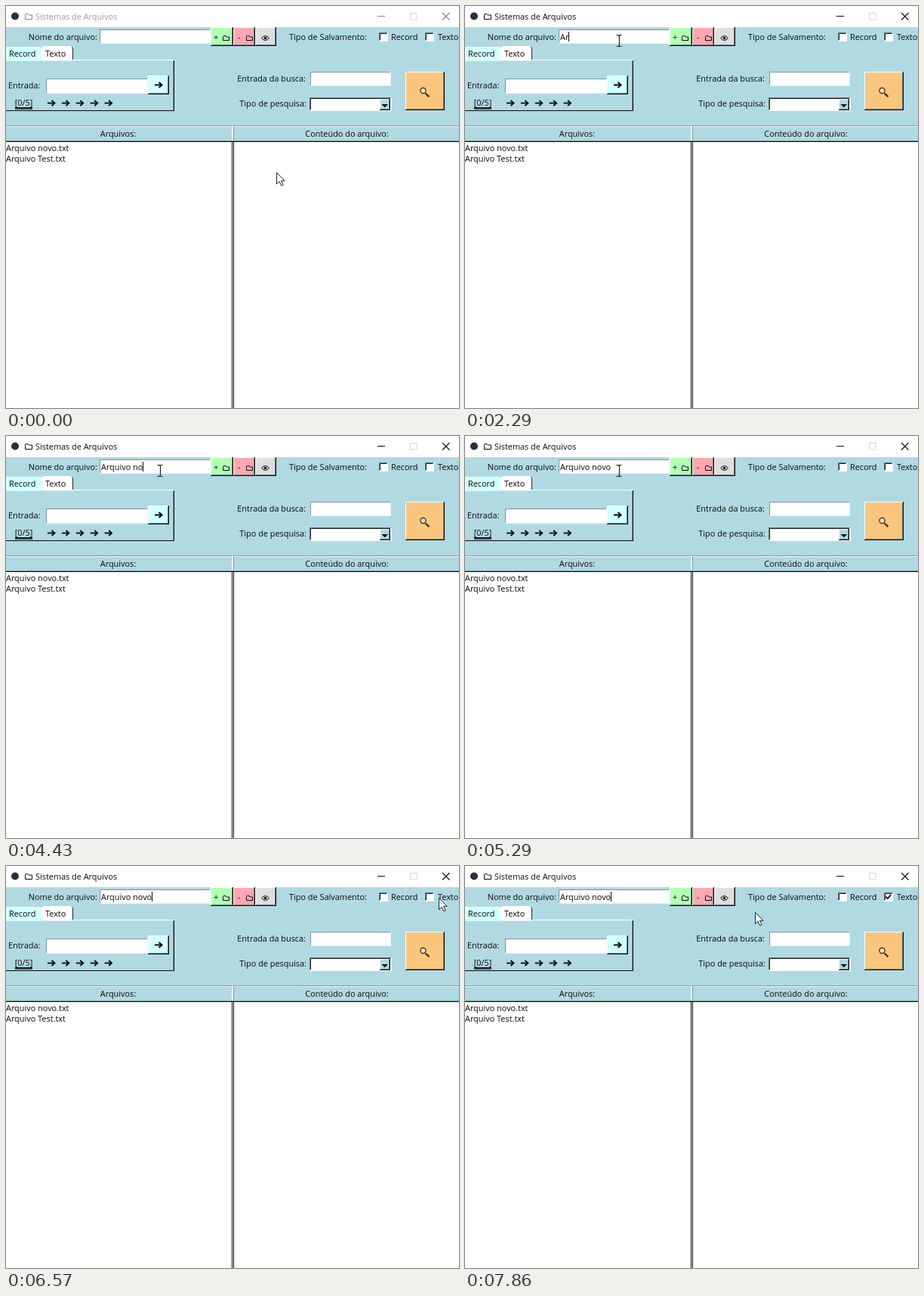
Recreate the animation shown at these times as an HTML page. Size 600 by 532 pixels, loop 8000 ms.

```html
<!DOCTYPE html>
<html lang="pt">
<head>
<meta charset="utf-8">
<title>Sistemas de Arquivos</title>
<style>
html, body { margin: 0; width: 100%; height: 100%; overflow: hidden; background: #fff; }
svg { display: block; width: 600px; height: 532px; }
text { font: 10.9px "Open Sans", "Noto Sans", sans-serif; fill: #0a0a0a; white-space: pre; }
rect { shape-rendering: crispEdges; }
</style>
</head>
<body>
<svg id="stage" viewBox="0 0 600 532" xmlns="http://www.w3.org/2000/svg"></svg>
<script>
const LOOP = 8000, FPS = 7;
const stage = document.getElementById('stage');
const BG = '#b1d9e2', INK = '#0a0a0a', CYAN = '#d2ffff';

function add(tag, attrs, parent = stage) {
  const el = document.createElementNS('http://www.w3.org/2000/svg', tag);
  for (const k in attrs) el.setAttribute(k, attrs[k]);
  return parent.appendChild(el);
}
const rect = (x, y, width, height, fill, parent) => add('rect', { x, y, width, height, fill }, parent);
const path = (d, stroke = INK, width = 1, fill = 'none', parent) =>
  add('path', { d, stroke, fill, 'stroke-width': width }, parent);
function label(str, x, y, anchor = 'start') {
  const el = add('text', { x, y, 'text-anchor': anchor });
  el.textContent = str;
  return el;
}
// Box with separate light and dark edges
function bevel(x, y, w, h, fill, light, dark) {
  rect(x, y, w, h, dark);
  rect(x, y, w - 1, h - 1, light);
  rect(x + 1, y + 1, w - 2, h - 2, fill);
}
function button(x, y, w, h, fill) {
  bevel(x, y, w, h, '#6d7678', '#f6ffff', '#111');
  rect(x + 1, y + 1, w - 3, h - 3, fill);
}
const entry = (x, y, w, h) => bevel(x, y, w, h, '#fff', '#7f9398', '#e8f4f6');
const folder = (x, y, w, h, parent) =>
  path(`M${x} ${y + h}V${y + 1}q0-1 1-1h2.5l1.2 1.5H${x + w}V${y + h}Z`, INK, 1, 'none', parent);
function arrow(x, y, w, thick) {
  path(`M${x} ${y}h${w - 1.5}`, INK, thick);
  path(`M${x + w - 4.5} ${y - 3.5}l4 3.5l-4 3.5`, INK, thick);
}

function checkbox(x) {
  bevel(x, 35, 12, 12, '#fff', '#62777c', '#f2ffff');
  path(`M${x + 1.5} 45V36.5H${x + 10.5}`, '#222');
}

// Title bar
rect(0, 0, 600, 28, '#fff');
add('circle', { cx: 12, cy: 13.5, r: 5, fill: '#26323b' });
const titleBits = add('g', {});
folder(25.5, 10.5, 9, 7, titleBits);
const title = label('Sistemas de Arquivos', 39, 18);
path('M492 13.5h10', INK, 1, 'none', titleBits);
path('M578 9l9.5 9.5m0-9.5l-9.5 9.5', INK, 1.1, 'none', titleBits);
path('M535.5 9.5h8.5v8.5h-8.5z', '#d6d6d6');

// Toolbar
rect(0, 28, 600, 152, BG);
label('Nome do arquivo:', 121, 45, 'end');
entry(124, 31, 147, 19);
button(271, 28, 30, 25, '#b3ffb4');
button(301, 28, 29, 25, '#fba8b3');
button(330, 28, 28, 25, '#dfdfdf');
label('+', 275, 45);
label('-', 307, 45);
folder(287.5, 39.5, 8, 6);
folder(318.5, 39.5, 8, 6);
path('M338.5 42.5q5-6 10 0q-5 6-10 0z');
add('circle', { cx: 343.5, cy: 42.5, r: 1.8, fill: INK });
label('Tipo de Salvamento:', 375, 45);
checkbox(494);
label('Record', 510, 45);
checkbox(555);
label('Texto', 572, 45);
const tick = path('M557.5 40.5l2.3 2.6l4.2-5', INK, 1.8);

// Notebook
rect(0, 54, 46, 19, CYAN);
path('M46.5 72V56l-1.5-1.5H0', '#f4ffff');
path('M47.5 72V55.5l2-2h37l2 2V72z', '#fff', 1, '#fff');
path('M88.5 72V55.5l-1.5-1.5', '#222');
rect(46, 71, 177, 1, '#f4ffff');
rect(222, 72, 1, 67, INK);
rect(221, 73, 1, 65, '#7d989f');
rect(0, 138, 223, 1, INK);
label('Record', 4, 67);
label('Texto', 52, 67);
label('Entrada:', 3, 109);
entry(53, 96, 135, 20);
button(188, 92, 28, 25, CYAN);
arrow(197, 104.5, 10, 2);
label('[0/5]', 23.5, 132, 'middle');
rect(12, 134, 23, 1, INK);
rect(12, 135, 23, 2, '#33464b');
for (let i = 0; i < 5; i++) arrow(55 + i * 18.9, 128.5, 10, 1.8);

// Search
label('Entrada da busca:', 397, 100, 'end');
entry(403, 87, 107, 19);
label('Tipo de pesquisa:', 398, 133, 'end');
bevel(402, 121, 109, 18, '#fff', '#62777c', '#f2ffff');
path('M403.5 137V122.5H509', '#222');
button(495, 123, 14, 15, BG);
path('M497.5 130h8.5l-4.2 4.3z', 'none', 0, INK);
button(529, 87, 52, 51, '#fac67d');
path('M555.5 115.5l5 4.7', '#4b2c12', 2.4);
add('circle', { cx: 552.5, cy: 112, r: 3.6, fill: '#f5dfb8', stroke: '#2b2013', 'stroke-width': 1.2 });

// Panels
function panel(x, w, caption, cx) {
  rect(x, 158, w, 22, '#f0fbfd');
  rect(x, 158, w - 1, 21, '#7c989f');
  rect(x + 1, 159, w - 2, 20, '#f0fbfd');
  rect(x + 1, 160, w - 3, 18, BG);
  rect(x, 178, w, 1, '#7c989f');
  label(caption, cx, 173, 'middle');
}
panel(-1, 302, 'Arquivos:', 148.5);
panel(301, 301, 'Conteúdo do arquivo:', 451.5);
rect(0, 179, 600, 353, '#fff');
rect(0, 179, 600, 1, INK);
rect(299, 180, 1, 352, INK);
rect(301, 180, 1, 352, INK);
label('Arquivo novo.txt', 0, 192);
label('Arquivo Test.txt', 0, 206);

// Moving parts
const typed = label('', 126, 45);
const caret = rect(126, 34, 1, 13, INK);
const pointer = path('M.5 .5V15.6L4 12.2l2.7 5.6l2.4-1.1l-2.6-5.4h4.6z', '#222', 1, '#fff');
const ibeam = path('M-3.5 -7.5h2.5l1 1l1-1h2.5M.5 -6.5V6.5M-3.5 7.5h2.5l1-1l1 1h2.5', '#222', 1.2);

const NAME = 'Arquivo novo';
const KEYS = [2100, 2240, 2390, 2520, 2650, 2780, 2930, 4100, 4240, 4380, 4510, 4640];
const FOCUS = 990, CHECK = 6850;
const MOVES = [
  { t: 0, x: 358, y: 220 },
  { t: 800, x: 203.5, y: 45.5 },
  { t: 5290, x: 203.5, y: 45.5 },
  { t: 6400, x: 573, y: 42 },
  { t: 6950, x: 573, y: 42 },
  { t: 7857, x: 384, y: 61 }
];

function mouseAt(t) {
  const i = MOVES.findIndex(m => m.t > t);
  if (i < 0) return MOVES[MOVES.length - 1];
  const a = MOVES[i - 1], b = MOVES[i];
  const u = (t - a.t) / (b.t - a.t), e = u * u * (3 - 2 * u);
  return { x: a.x + (b.x - a.x) * e, y: a.y + (b.y - a.y) * e };
}
const show = (el, on) => el.setAttribute('visibility', on ? 'visible' : 'hidden');

function draw(t) {
  const active = t >= FOCUS;
  title.style.fill = active ? INK : '#999';
  titleBits.setAttribute('opacity', active ? 1 : .5);

  const count = KEYS.filter(k => k <= t).length;
  typed.textContent = NAME.slice(0, count);
  const since = t - (count ? KEYS[count - 1] : FOCUS);
  show(caret, active && since % 900 < 600);
  const width = count ? typed.getComputedTextLength() : 0;
  caret.setAttribute('x', Math.round(126 + width - .4));

  show(tick, t >= CHECK);

  const { x, y } = mouseAt(t);
  const inEntry = x > 124 && x < 270 && y > 31 && y < 50;
  const cursor = inEntry ? ibeam : pointer;
  cursor.setAttribute('transform', `translate(${Math.round(x)} ${Math.round(y)})`);
  show(ibeam, inEntry);
  show(pointer, !inEntry);
}

const start = performance.now();
function tickFrame(now) {
  const t = Math.max(0, now - start) % LOOP;
  draw(Math.floor((t + 3) * FPS / 1000) * 1000 / FPS % LOOP);
  requestAnimationFrame(tickFrame);
}
draw(0);
requestAnimationFrame(tickFrame);
</script>
</body>
</html>
```
